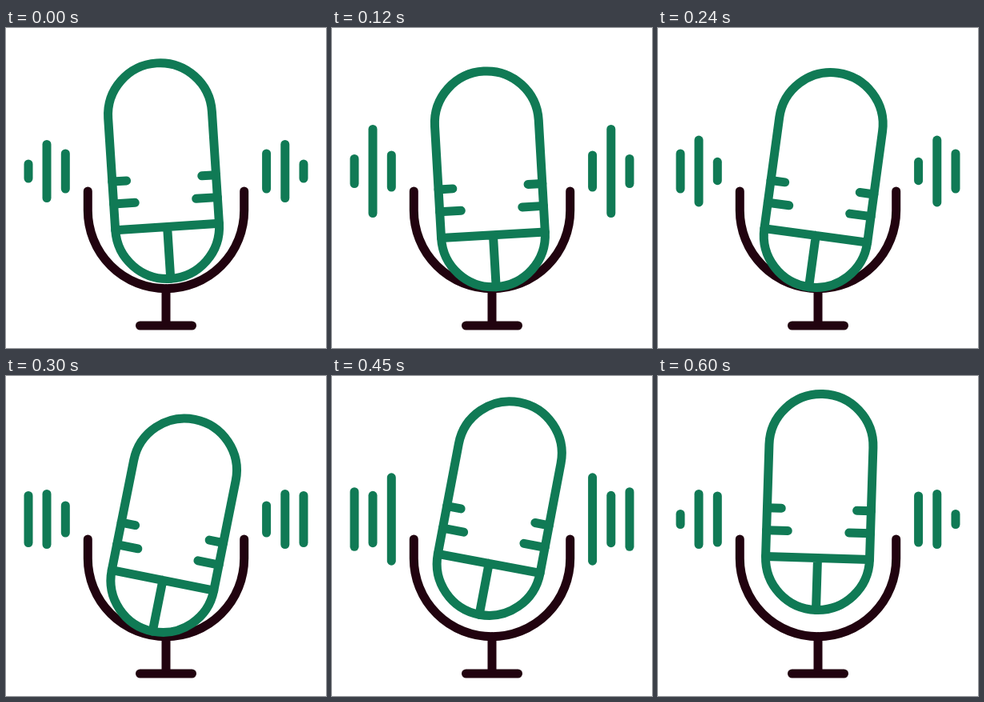
An HTML page that plays this animation: 400 px wide and 400 px high, repeating every 0.63 s.

```html
<!DOCTYPE html>
<html lang="en">
<head>
<meta charset="utf-8">
<title>Microphone</title>
<style>
  html, body { margin: 0; width: 100%; height: 100%; overflow: hidden; background: #fff; }
  svg { display: block; width: 100%; height: 100%; }
  g { fill: none; stroke-width: 11; stroke-linecap: round; }
  .dark { stroke: #21030f; }
  .green { stroke: #107a55; }
</style>
</head>
<body>
<svg viewBox="0 0 400 400">
  <g class="dark">
    <path d="M102.3 204V228A97.7 97.7 0 0 0 297.7 228V204M200 325.5V372M167.5 372H232.5"/>
  </g>
  <g class="green" id="bars"></g>
  <g class="green" id="mic">
    <rect x="-65" y="-183.5" width="130" height="270" rx="65"/>
    <path d="M-65 21.5H65M0 21.5V86.5M-65 -39.2H-47.2M-65 -11.2H-38.3M65 -39.2H47.2M65 -11.2H38.3"/>
  </g>
</svg>
<script>
const LOOP = 630, STEP = 30, CYCLE = 720;
const MID_Y = 179, CAP = 5.5;

// The motion has a 720 ms cycle that is cut at 630 ms.
const times = [0, 120, 180, 300, 390, 510, 600];
const tracks = {
  lift:  [227, 237.3, 238.8, 234.3, 222, 206.7, 206],
  tilt:  [-3.7, -3.3, 2.6, 11.3, 12.3, 7.8, 1.8],
  outer: [14.5, 21, 22, 35, 45, 29.5, 12],
  mid:   [39, 58, 53, 37, 36, 35, 37],
  inner: [27.5, 25.5, 19, 22.5, 48, 58, 34.5]
};

const count = times.length;
const wrap = i => (i + count) % count;
const span = i => (times[i + 1] ?? CYCLE) - times[i];

function slope(track, i) {
  const a = wrap(i - 1), b = wrap(i + 1);
  const before = span(a), after = span(i);
  const dIn = (track[i] - track[a]) / before;
  const dOut = (track[b] - track[i]) / after;
  return (before * dOut + after * dIn) / (before + after);
}

// Smooth periodic cubic through the key poses.
function valueAt(track, t) {
  let i = count - 1;
  while (times[i] > t) i--;
  const j = wrap(i + 1), h = span(i), u = (t - times[i]) / h, v = 1 - u;
  return v * v * (1 + 2 * u) * track[i] + u * u * (3 - 2 * u) * track[j]
    + h * u * v * (v * slope(track, i) - u * slope(track, j));
}

const mic = document.getElementById('mic');
const group = document.getElementById('bars');
const bars = [
  ['outer', 28], ['mid', 51], ['inner', 74.3],
  ['inner', 325.6], ['mid', 348.8], ['outer', 372]
].map(([name, x]) => {
  const line = document.createElementNS(group.namespaceURI, 'line');
  line.setAttribute('x1', x);
  line.setAttribute('x2', x);
  group.append(line);
  return { line, track: tracks[name] };
});

function draw(t) {
  const y = valueAt(tracks.lift, t), angle = valueAt(tracks.tilt, t);
  mic.setAttribute('transform', `translate(200.2 ${y}) rotate(${angle})`);
  for (const { line, track } of bars) {
    const half = valueAt(track, t) - CAP;
    line.setAttribute('y1', MID_Y - half);
    line.setAttribute('y2', MID_Y + half);
  }
}

const start = performance.now();
function tick() {
  const t = (performance.now() - start) % LOOP;
  draw(Math.floor(t / STEP) * STEP);
  requestAnimationFrame(tick);
}
tick();
</script>
</body>
</html>
```
